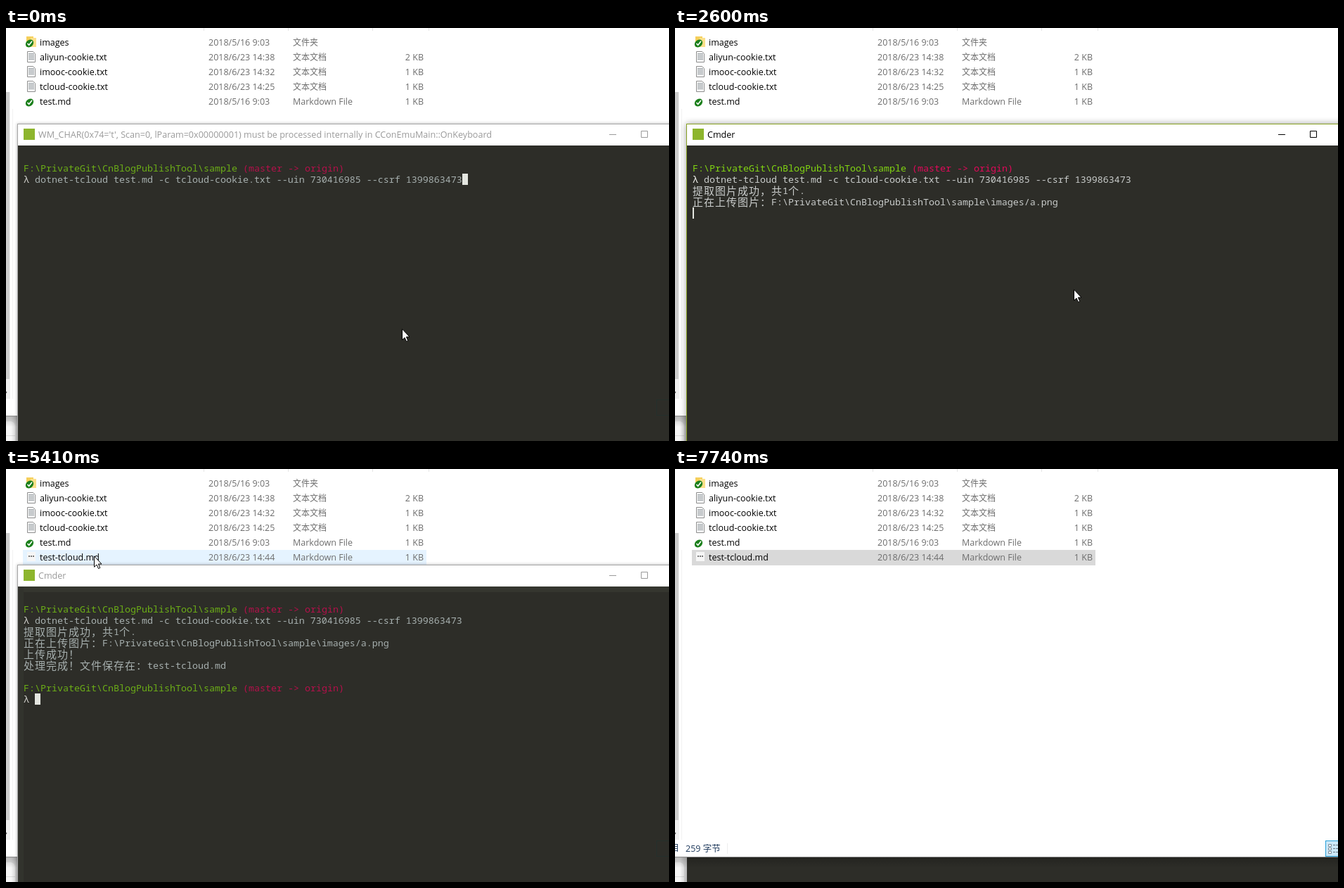
Write an HTML page that moves like this. It is 943 px wide and 587 px high and loops after 7.84 s.

```html
<!DOCTYPE html>
<html lang="zh">
<head>
<meta charset="utf-8">
<title>Terminal upload</title>
<style>
html, body { margin: 0; width: 100%; height: 100%; overflow: hidden; background: #fff; }
svg { display: block; width: 943px; height: 587px; }
text { white-space: pre; }
.ui { font: 12.5px "Open Sans", "Noto Sans CJK SC", "Noto Sans CJK", sans-serif; fill: #000; }
.gray { fill: #6d6d6d; }
.han { font-size: 12px; }
.mono { font: 13.333px "Noto Sans Mono", monospace; }
.wide { font: 15px "Noto Sans CJK SC", "Noto Sans CJK", sans-serif; letter-spacing: 1px; }
#term { --edge: #86a021; --title: #000; --path: #82d612; --branch: #e3085a; --out: #c9cccb; --lambda: #f4f4f0; }
#term.blur { --edge: #a6a6a6; --title: #9a9a9a; }
#term.dim { --path: #6cae17; --branch: #b5104b; --out: #a6afae; --lambda: #d0d0cc; }
#frame { fill: var(--edge); filter: drop-shadow(0 0 5px rgba(0,0,0,.38)); }
.blur #frame { filter: drop-shadow(0 0 2px rgba(0,0,0,.3)); }
#title { fill: var(--title); font-size: 12.57px; }
#buttons { fill: none; stroke: var(--title); }
.path { fill: var(--path); }
.branch { fill: var(--branch); }
.out { fill: var(--out); }
.lambda { fill: var(--lambda); }
</style>
</head>
<body>
<svg id="stage" viewBox="0 0 943 587">
  <defs>
    <linearGradient id="fade" x2="0" y2="1">
      <stop stop-color="#000" stop-opacity=".4"/><stop offset="1" stop-color="#000" stop-opacity="0"/>
    </linearGradient>
    <linearGradient id="side">
      <stop stop-color="#000" stop-opacity="0"/><stop offset="1" stop-color="#000" stop-opacity=".2"/>
    </linearGradient>
  </defs>

  <g id="explorer">
    <rect width="943" height="587" fill="#fff"/>
    <rect y="91" width="6" height="436" fill="#f0f0f0"/>
    <rect y="91" width="5" height="408" fill="#cdcdcd"/>
    <path d="M0 516.500l1.500 1-1.500 2z" fill="#444"/>
    <path d="M9.500 115V527" stroke="#f1f1f1"/>
    <path d="M281.500 0V4M401.500 0V4M521.500 0V4M601.500 0V4" stroke="#e5e5e5"/>
    <rect id="mark" x="24.500" y="115.500" width="573" height="21"/>
  </g>

  <g id="below">
    <rect y="551" width="943" height="36" fill="#2d2d28"/>
    <rect y="551" width="17" height="36" fill="#e6e6e6"/>
    <path d="M0 559H7Q13 560 13 567V587H0Z" fill="#f7f7f7"/>
    <path d="M0 579.500H13" stroke="#ddd"/>
    <rect x="7" y="552" width="10" height="35" fill="url(#side)"/>
    <rect id="drop" y="552" width="943" height="15" fill="url(#fade)"/>
    <path d="M0 551.500H943" stroke="#8a8a8a"/>
  </g>

  <g id="status">
    <text class="ui han" x="-6" y="543" style="fill:#1e395b">目</text>
    <text class="ui" x="15" y="544" style="fill:#1e395b">259 字节</text>
    <path d="M74.500 532V547" stroke="#eee"/>
    <rect x="925.500" y="528.500" width="24" height="22" fill="#cce8f8" stroke="#26a0da"/>
    <path d="M929.500 533.500h4v3h-4zM929.500 538.500h4v3h-4zM929.500 543.500h4v3h-4z" fill="#fff" stroke="#7b8b98"/>
    <path d="M936 534.500h3m1 0h3M936 539.500h3m1 0h3M936 544.500h3m1 0h3" stroke="#6b7781"/>
  </g>

  <g id="term">
    <rect id="frame" x="16" y="136" width="960" height="480"/>
    <rect x="17" y="137" width="926" height="30" fill="#fff"/>
    <rect x="17" y="167" width="926" height="420" fill="#2d2d28"/>
    <g id="inset">
      <rect x="17" y="167" width="926" height="8" fill="#35362f"/>
      <rect x="17" y="167" width="8" height="420" fill="#32332d"/>
    </g>
    <rect id="ghost" x="925.500" y="528.500" width="24" height="22" fill="none" stroke="#24302c"/>
    <rect x="25" y="143" width="16" height="16" fill="#8db52d"/>
    <text id="title" class="ui" x="46" y="156"></text>
    <path id="buttons" d="M858 151.500h10M903.500 146.500h9v9h-9z"/>
    <g id="lines"></g>
    <rect id="caret" height="16" fill="#e4e6e0"/>
  </g>

  <g id="mouse" fill="#fff" stroke="#000">
    <path id="arrow" d="M.5 .8V16.300L4 13 6.500 18.500 8.800 17.500 6.400 12H11Z"/>
    <path id="resize" d="M0-11.500L4.500-6.500H1.500V6.500H4.500L0 11.500-4.500 6.500H-1.500V-6.500H-4.500Z"/>
  </g>
</svg>
<script>
const LOOP = 7840;
const $ = id => document.getElementById(id);

function add(parent, tag, attrs, content = '') {
  const node = document.createElementNS('http://www.w3.org/2000/svg', tag);
  for (const key in attrs) node.setAttribute(key, attrs[key]);
  node.textContent = content;
  return parent.appendChild(node);
}

const icons = {
  folder(g, y) {
    add(g, 'path', { d: `M29 ${y - 8}h10v15h-10z`, fill: '#f5cf5b' });
    add(g, 'path', { d: `M35 ${y - 6}h8v13h-8z`, fill: '#fbe08a' });
    icons.tick(g, y);
  },
  page(g, y) {
    add(g, 'path', { d: `M30.500 ${y - 7.5}h8l3 3v12h-11z`, fill: '#fff', stroke: '#8c8c8c' });
    add(g, 'path', { d: [-4, -2, 0, 2, 4].map(n => `M32 ${y + n - .5}h8`).join(''), stroke: '#8f969b' });
  },
  tick(g, y) {
    const cx = 33.5, cy = y + 2;
    add(g, 'ellipse', { cx, cy, rx: 6.2, ry: 4.9, fill: '#1b7f1b', transform: `rotate(-40 ${cx} ${cy})` });
    add(g, 'path', { d: `M30.500 ${y + 2}l2.200 2.300 4.300-5.600`, fill: 'none', stroke: '#fff', 'stroke-width': 1.6 });
  },
  note(g, y) {
    add(g, 'rect', { x: 30, y: y - 7, width: 12, height: 13, fill: '#f6f6f6' });
    add(g, 'path', { d: `M32 ${y - 1}h8`, stroke: '#777', 'stroke-width': 2, 'stroke-dasharray': '2 1' });
  }
};

const files = [
  ['folder', 'images', '2018/5/16 9:03', '文件夹', ''],
  ['page', 'aliyun-cookie.txt', '2018/6/23 14:38', '文本文档', '2 KB'],
  ['page', 'imooc-cookie.txt', '2018/6/23 14:32', '文本文档', '1 KB'],
  ['page', 'tcloud-cookie.txt', '2018/6/23 14:25', '文本文档', '1 KB'],
  ['tick', 'test.md', '2018/5/16 9:03', 'Markdown File', '1 KB'],
  ['note', 'test-tcloud.md', '2018/6/23 14:44', 'Markdown File', '1 KB']
];
const fileRows = files.map(([icon, name, date, type, size], i) => {
  const g = add($('explorer'), 'g', {});
  const mid = 20 + 21 * i, y = mid + 5;
  const han = type[0] > '~' ? ' han' : '';
  icons[icon](g, mid);
  add(g, 'text', { class: 'ui', x: 48, y }, name);
  add(g, 'text', { class: 'ui gray', x: 288, y }, date);
  add(g, 'text', { class: 'ui gray' + han, x: 408, y }, type);
  add(g, 'text', { class: 'ui gray', x: 594, y, 'text-anchor': 'end' }, size);
  return g;
});

// Terminal grid: 8 px cells, 16 px rows; Chinese glyphs take two cells.
const rowTop = row => 191 + 16 * row;

function print(g, row, cls, x, text) {
  for (const run of text.match(/[^\x00-\u03ff]+|[\x00-\u03ff]+/g)) {
    const wide = run.charCodeAt(0) > 0x3ff;
    add(g, 'text', { class: `${wide ? 'wide' : 'mono'} ${cls}`, x, y: rowTop(row) + (wide ? 14 : 13) }, run);
    x += run.length * (wide ? 16 : 8);
  }
}

function prompt(g, row) {
  print(g, row, 'path', 25, 'F:\\PrivateGit\\CnBlogPublishTool\\sample');
  print(g, row, 'branch', 337, '(master -> origin)');
  print(g, row + 1, 'lambda', 25, 'λ');
}

const blocks = [
  g => {
    prompt(g, 0);
    print(g, 1, 'out', 41, 'dotnet-tcloud test.md -c tcloud-cookie.txt --uin 730416985 --csrf 1399863473');
  },
  g => {
    print(g, 2, 'out', 25, '提取图片成功，共1个.');
    print(g, 3, 'out', 25, '正在上传图片：F:\\PrivateGit\\CnBlogPublishTool\\sample\\images/a.png');
  },
  g => {
    print(g, 4, 'out', 25, '上传成功！');
    print(g, 5, 'out', 25, '处理完成！文件保存在：test-tcloud.md');
  },
  g => prompt(g, 7)
].map(draw => {
  const g = add($('lines'), 'g', {});
  draw(g);
  return g;
});

// caret: [x, row, width]; mouse: [x, y]
const steps = [
  [0, {
    title: "WM_CHAR(0x74='t', Scan=0, lParam=0x00000001) must be processed internally in CConEmuMain::OnKeyboard",
    blur: true, dim: true, inset: false, term: true, printed: 1, file: false,
    mark: 'none', caret: [649, 1, 8], mouse: [563, 427], resize: false, drop: .5
  }],
  [530, { mouse: [566, 388] }],
  [650, { mouse: [567, 371] }],
  [1220, { blur: false }],
  [1360, { dim: false, caret: [649, 1, 2] }],
  [1890, { caret: null }],
  [2040, { title: 'Cmder', caret: [25, 2, 2] }],
  [2600, { printed: 2, caret: [25, 4, 2] }],
  [3160, { caret: null }],
  [3750, { printed: 3, caret: [25, 6, 2] }],
  [3900, { printed: 4, caret: [41, 8, 2] }],
  [4300, { mouse: [479, 360] }],
  [4450, { mouse: [287, 303], caret: null }],
  [4600, { mouse: [284, 301] }],
  [4750, { mouse: [212, 190], file: true }],
  [4870, { mouse: [181, 137.5], resize: true }],
  [4990, { mouse: [157, 123], resize: false, mark: 'hover', caret: [41, 8, 2] }],
  [5140, { mouse: [139, 125] }],
  [5290, { mouse: [125, 123], blur: true }],
  [5410, { dim: true, inset: true, caret: [41, 8, 8] }],
  [5560, { term: false, mark: 'chosen', drop: 1 }],
  [6120, { mouse: [144, 140] }],
  [6270, { mouse: [290, 265] }],
  [6390, { mouse: [530, 430] }],
  [6510, { mouse: [755, 568] }],
  [6630, { mouse: [872, 545] }],
  [6780, { mouse: [916, 580] }],
  [6930, { mouse: null }],
  [7740, { mark: 'idle', drop: .5 }]
];

const marks = {
  none: ['none', 'none'],
  hover: ['#e5f3ff', '#e5f3ff'],
  chosen: ['#cce8ff', '#99d1ff'],
  idle: ['#d9d9d9', '#d9d9d9']
};

const show = (node, on) => node.setAttribute('display', on ? 'inline' : 'none');

function render(t) {
  const s = {};
  for (const [start, change] of steps) if (start <= t) Object.assign(s, change);

  const [fill, stroke] = marks[s.mark];
  $('mark').setAttribute('fill', fill);
  $('mark').setAttribute('stroke', stroke);
  show(fileRows[5], s.file);

  show($('status'), !s.term);
  $('drop').setAttribute('opacity', s.drop);
  show($('term'), s.term);
  $('term').classList.toggle('blur', s.blur);
  $('term').classList.toggle('dim', s.dim);
  $('title').textContent = s.title;
  show($('inset'), s.inset);
  show($('ghost'), s.dim);
  blocks.forEach((g, i) => show(g, i < s.printed));

  show($('caret'), s.caret);
  if (s.caret) {
    const [x, row, width] = s.caret;
    $('caret').setAttribute('x', x);
    $('caret').setAttribute('y', rowTop(row));
    $('caret').setAttribute('width', width);
  }

  show($('mouse'), s.mouse);
  if (s.mouse) $('mouse').setAttribute('transform', `translate(${s.mouse})`);
  show($('arrow'), !s.resize);
  show($('resize'), s.resize);
}

let shown = -1;
const began = performance.now();
function tick() {
  const t = (performance.now() - began) % LOOP;
  const index = steps.filter(([start]) => start <= t).length;
  if (index !== shown) render(t);
  shown = index;
  requestAnimationFrame(tick);
}
tick();
</script>
</body>
</html>
```
